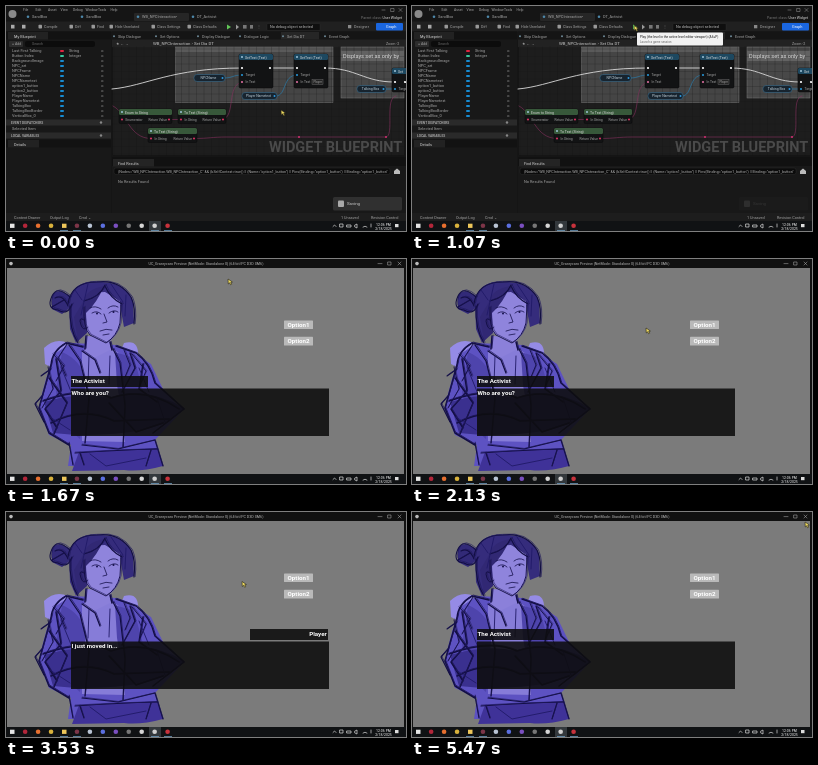
Write an HTML page that moves like this. It is 400 px wide and 225 px high and loops after 5.54 s.

```html
<!DOCTYPE html>
<html lang="en">
<head>
<meta charset="utf-8">
<title>Dialogue widget preview</title>
<style>
html, body { margin: 0; width: 100%; height: 100%; overflow: hidden; background: #111; }
svg { display: block; width: 100vw; height: 100vh; font-family: Roboto, "Open Sans", sans-serif; }
</style>
</head>
<body>
<svg id="stage" viewBox="0 0 400 225" preserveAspectRatio="none"></svg>
<script>
const LOOP = 5540;
const rect = (x, y, w, h, fill, extra = '') =>
  `<rect x="${x}" y="${y}" width="${w}" height="${h}" fill="${fill}" ${extra}/>`;
const dot = (x, y, r, fill) => `<circle cx="${x}" cy="${y}" r="${r}" fill="${fill}"/>`;
const label = (x, y, text, size = 3.9, fill = '#a6a6a6', extra = '') =>
  `<text x="${x}" y="${y}" font-size="${size}" fill="${fill}" ${extra}>${text}</text>`;
const shape = (d, fill) => `<path d="${d}" fill="${fill}"/>`;
const line = (d, color, width = 0.6) =>
  `<path d="${d}" fill="none" stroke="${color}" stroke-width="${width}" stroke-linecap="round" stroke-linejoin="round"/>`;
const group = (id, body) => `<g id="${id}">${body}</g>`;
const BOLD = 'font-weight="700"';
const END = 'text-anchor="end"';
const MIDDLE = 'text-anchor="middle"';

function node(x, y, w, h, title, header, rows, firstRow) {
  return rect(x, y, w, h, '#121314', 'rx="1.5" stroke="#08090a" stroke-width=".5"') +
    rect(x, y, w, 6, header, 'rx="1.5"') +
    label(x + 6, y + 4.5, title, 3.5, '#dcdcdc') + dot(x + 3, y + 3, 1, '#9ec3d8') +
    rows.map(([left, right, color], i) => {
      const cy = y + firstRow + i * 7;
      return dot(x + 3, cy, 1.1, color) + label(x + 6.5, cy + 1.2, left, 3.3) +
        (right ? label(x + w - 5, cy + 1.2, right, 3.3, '#a6a6a6', END) : '') +
        (right || !left ? dot(x + w - 3, cy, 1.1, color) : '');
    }).join('');
}
const setText = x => node(x, 48, 34, 34, 'SetText (Text)', '#1d4860',
  [['', '', '#fff'], ['Target', '', '#2794d2'], ['In Text', '', '#db6e9e']], 14);
const convert = (x, y, w, title, input) => node(x, y, w, 14.5, title, '#37583a', [[input, 'Return Value', '#d0305f']], 10.5);

const pill = (x, y, w, text) =>
  rect(x, y, w, 7, '#17242f', 'rx="3" stroke="#3b6c8c" stroke-width=".6"') +
  label(x + w / 2 - 1, y + 4.8, text, 3.4, '#c5d3dc', MIDDLE) + dot(x + w - 2.5, y + 3.5, 1, '#2d9ae0');

function editorChrome() {
  const tabs = [[26, 'SandBox'], [80, 'SandBox'], [136, 'WB_NPCInteraction•'], [191, 'DT_Activist']];
  const tools = [[38, 'Compile'], [69, 'Diff'], [91, 'Find'], [109, 'Hide Unrelated'], [151, 'Class Settings'], [187, 'Class Defaults']];
  return rect(0, 0, 400, 225, '#151515') +
    dot(6.5, 8, 4, '#8a8a8a') +
    ['File', 'Edit', 'Asset', 'View', 'Debug', 'Window', 'Tools', 'Help'].map((s, i) => label(17 + i * 12.5, 5, s, 3.4)).join('') +
    rect(128, 7, 55, 8, '#262626', 'rx="1"') +
    tabs.map(([x, s]) => dot(x - 4, 10.8, 1.3, '#4d87aa') + label(x, 12.3, s, 3.9)).join('') +
    label(396, 12.5, 'Parent class: <tspan fill="#dedede">User Widget</tspan>', 3.6, '#777', END) +
    line('M376 4h3M385 2.5h3v3h-3zM393 2.5l3 3M396 2.5l-3 3', '#999', 0.5) +
    rect(0, 15.5, 400, 10, '#202020') +
    tools.map(([x, s]) => rect(x - 5.5, 18.8, 3.5, 3.7, '#999', 'rx=".7"') + label(x, 22, s, 3.7)).join('') +
    rect(5, 18.8, 3.5, 3.7, '#aaa') + rect(16, 18.8, 3.5, 3.7, '#aaa') +
    shape('M221 18.5v5l4-2.5z', '#61c857') + shape('M230 18.5v5l3-2.5z', '#999') +
    rect(237, 19, 3.6, 3.6, '#777') + rect(244, 19, 3, 3.6, '#777') + label(251, 22.3, '⋮', 4) +
    rect(261, 17.5, 53, 7, '#0f0f0f', 'rx="1" stroke="#3a3a3a" stroke-width=".3"') +
    label(264, 22.2, 'No debug object selected', 3.8, '#c0c0c0') +
    rect(342, 19, 3.3, 3.3, '#888') + label(348, 22.2, 'Designer', 3.8) +
    rect(370, 17, 27, 7.5, '#1a66df', 'rx="1"') + label(380, 22.3, 'Graph', 3.9, '#fff');
}

function sidePanel() {
  const names = ['Last First Talking', 'Button Index', 'BackgroundImage', 'NPC_art', 'NPCFrame', 'NPCName', 'NPCNametext',
    'option1_button', 'option2_button', 'PlayerName', 'PlayerNametext', 'TalkingBox', 'TalkingBoxBorder', 'VerticalBox_0'];
  const section = (y, text) => rect(0, y, 105, 6, '#2a2a2a') + label(5, y + 4.3, text, 3.3, '#a6a6a6', BOLD) + dot(95, y + 3, 1.2, '#888');
  return rect(0, 25.5, 105, 181.5, '#181818') + rect(0, 25.5, 105, 8, '#121212') + rect(2, 26, 40, 7.5, '#222') +
    label(8, 31.8, 'My Blueprint', 3.9, '#d5d5d5') +
    rect(3, 35, 14, 6, '#2c2c2c', 'rx="1"') + label(6, 39.4, '+ Add', 3.6) +
    rect(19, 35, 70, 6, '#0c0c0c', 'rx="2"') + label(26, 39.4, 'Search', 3.6, '#686868') +
    names.map((s, i) => {
      const y = 46.2 + i * 5;
      const kind = ['String', 'Integer'][i];
      const color = ['#e0243f', '#39c9a0'][i] || '#178bd2';
      return label(6, y, s, 3.9) + rect(54, y - 2.3, 4, 2, color, 'rx="1"') +
        (kind ? label(63, y, kind, 3.9) : '') + rect(95, y - 1.8, 2.5, 1, '#777', 'rx=".5"');
    }).join('') +
    section(113.5, 'EVENT DISPATCHERS') + label(6, 124.3, 'Selected Item') + section(126.5, 'LOCAL VARIABLES') +
    rect(0, 133.5, 105, 8, '#121212') + rect(2, 134, 31, 7.5, '#222') + label(8, 139.5, 'Details', 3.9, '#d5d5d5');
}

function graph() {
  const tabs = [[112, 'Skip Dialogue'], [154, 'Set Options'], [196, 'Display Dialogue'], [238, 'Dialogue Logic'], [281, 'Set Dia DT'], [323, 'Event Graph']];
  let grid = '';
  for (let x = 108; x < 398; x += 7.5) grid += `M${x} 41V149`;
  for (let y = 43; y < 149; y += 7.5) grid += `M107 ${y}H398`;
  return rect(106, 25.5, 294, 124.5, '#151515') + rect(275, 26, 38, 7.5, '#262626') +
    tabs.map(([x, s]) => dot(x - 4, 30.3, 1, '#6d8796') + label(x, 31.8, s, 3.8)).join('') +
    rect(106, 33.5, 294, 7.5, '#222') + label(110, 39, '★  ←  →', 3.8) +
    label(147, 39.4, 'WB_NPCInteraction  ›  Set Dia DT', 4.3, '#c8c8c8') + label(380, 39.2, 'Zoom -2', 3.6) +
    rect(107, 41, 291, 108, '#1d1d1d') +
    rect(169.5, 41, 157.5, 55.5, '#454545', 'stroke="#777" stroke-width=".5"') + rect(170, 41, 157, 5, '#5a5a5a') +
    rect(335, 41, 63, 51, '#484848', 'stroke="#777" stroke-width=".5"') + rect(335, 45, 63, 10, '#626262') +
    `<g opacity=".6">${line(grid, '#161616', 0.35)}</g>` +
    label(337, 52.3, 'Displays set as only by', 5.6, '#d9d9d9') +
    line('M106 83C140 80 165 62 236 62M264 62H291M319 62C350 62 358 76 388 76', '#d8d8d8', 0.9) +
    line('M219 72C226 72 227 69 236 69M270 90C281 90 276 69 291 69M380 83H388', '#2685bd') +
    line('M163 113.5H175M107 100C121 107 123 132.5 145 132.5M188 132.5C203 132.5 206 131 220 131H380M217 113.5C230 110 220 79 236 76M380 131C389 131 378 91 390 90', '#87305f', 0.6) +
    dot(293, 131, 1, '#d0306f') + dot(380, 131, 1, '#d0306f') +
    setText(233) + setText(288) +
    rect(306, 73.5, 11, 5, '#242424', 'stroke="#777" stroke-width=".4"') + label(307.5, 77.2, 'Player', 3) +
    pill(188, 68.5, 31, 'NPCName') + pill(236, 86.5, 35, 'Player Nametext') + pill(351, 79.5, 29, 'Talking Box') +
    node(386, 62, 16, 24, 'Set', '#1d4860', [['', '', '#fff'], ['Target', '', '#2794d2']], 14) +
    convert(113, 103, 53, 'Enum to String', 'Enumerator') +
    convert(172, 103, 48, 'To Text (String)', 'In String') + convert(142, 122, 49, 'To Text (String)', 'In String') +
    label(263, 146, 'WIDGET BLUEPRINT', 14.5, '#4a4a4a', BOLD);
}

function lowerPanels() {
  const query = '(Nodes="WB_NPCInteraction.WB_NPCInteraction_C" &amp;&amp; (bSelfContext=true)) || (Name="option1_button") || Pins(Binding="option1_button") || Binding="option1_button"';
  return rect(106, 151, 294, 56, '#181818') + rect(106, 151, 294, 9, '#111') + rect(107, 153, 41, 7.5, '#242424') +
    label(112, 158.8, 'Find Results', 3.8, '#d4d4d4') + rect(108, 162, 276, 6.5, '#0b0b0b', 'rx="2" stroke="#333" stroke-width=".4"') +
    label(112, 166.6, query, 3.7, '#b4b4b4') + shape('M388 165l3-2.5 3 2.5v3h-6z', '#bbb') +
    label(112, 177, 'No Results Found', 3.9) +
    rect(0, 207, 400, 8, '#1d1d1d') +
    label(8, 213, 'Content Drawer', 3.8) + label(44, 213, 'Output Log', 3.8) + label(73, 213, 'Cmd ⌄', 3.8) +
    label(335, 213, '1 Unsaved', 3.8) + label(365, 213, 'Revision Control', 3.8);
}

const toast = rect(327, 191, 69, 13.5, '#303030', 'rx="1.5"') + rect(332, 194.5, 6, 6.5, '#aaa', 'rx="1"') + label(341, 198.5, 'Saving', 4.4, '#ccc');
const tooltip = rect(225, 26.5, 86, 13, '#f2f2f2', 'rx="1"') +
  label(228, 31.8, 'Play (the level in the active level editor viewport) (Alt+P)', 3.2, '#111') +
  label(228, 37, 'Launch a game session', 3, '#666');

// Two slightly displaced passes give the hand-drawn line.
const sketch = (d, width = 1) => line(d, '#120e42', width * 1.15) +
  `<g transform="translate(.8 -.7) rotate(.4 95 120)">${line(d, '#1d1658', width * 0.65)}</g>`;

function character() {
  return shape('M38 89Q49 78 62 84L54 113L39 105ZM118 84Q133 80 132 97L125 111L112 99Z', '#958be6') +
    shape('M65 84L50 94Q39 116 33 150L43 176L65 186L62 207H157L149 181L177 151L158 132L145 105L128 94L111 86Z', '#5d52c2') +
    shape('M79 77Q82 88 76 95L82 117L111 121L117 97L104 88V78Z', '#8b80da') +
    shape('M76 92L88 99L104 91L113 99L119 183L76 182Z', '#867cd8') +
    shape('M56 93Q75 101 80 121L74 180L57 165L50 133ZM109 93L128 99L139 139L119 172L111 126Z', '#4e44ac') +
    shape('M38 143Q75 132 105 139Q142 127 178 149L163 163L138 171Q91 179 47 174Z', '#3a308f') +
    shape('M73 193L152 189L157 207Q135 213 118 211L66 212Z', '#3f3298') +
    shape('M63 40Q69 20 96 23Q120 24 127 42L128 64L118 68L113 41L78 39L81 72L70 84L64 70Z', '#352c7c') +
    shape('M46 42Q44 33 54 32L65 37L65 48L56 55L46 50Z', '#322a78') +
    shape('M77 45Q82 33 99 33L114 42L115 64Q111 78 101 84Q89 81 81 73Z', '#8f84dc') +
    shape('M77 43Q80 30 98 27Q91 44 80 54L81 74L72 82L68 58Z', '#312874') +
    sketch('M62 45Q65 23 91 23Q113 20 125 38Q130 49 128 65M64 47Q63 70 72 84M78 42Q94 38 99 26M99 27Q104 39 116 45') +
    sketch('M64 38Q51 26 46 37Q40 50 52 51Q62 57 66 45M49 39Q57 35 62 47M46 48L58 41', 0.9) +
    sketch('M78 48Q77 69 84 76L100 84Q111 77 114 64L115 46M78 61Q72 57 75 66Q77 72 81 69', 0.8) +
    line('M84 49Q89 46 95 50M102 49Q107 45 112 48M86 54Q91 51 95 55M103 54Q108 50 112 53M98 55L101 63L97 64M94 72Q100 69 106 71M97 76L103 75', '#17124d', 0.8) +
    dot(91, 54.5, 1, '#17124d') + dot(107.5, 53, 1, '#17124d') +
    sketch('M80 77L79 90M104 83L106 91M77 88L60 84Q46 92 45 106L33 149L43 174L63 186M110 87L130 94Q144 104 149 124L178 150L147 174', 1.3) +
    sketch('M63 86L74 102L83 138L79 184M76 92L89 101L94 114M107 90L114 104L119 147L117 188M124 94L129 109L116 133', 1.1) +
    sketch('M50 100L55 132L39 150L51 169M43 119L61 144L48 175M137 105L133 130L151 143M37 142Q78 127 105 139Q140 127 173 150M45 164Q77 147 108 162L163 160M103 144L130 173L157 164', 1.3) +
    sketch('M63 184L67 206M76 186L112 190L149 181L157 207M69 194Q112 191 151 190M74 194L78 206M145 191L140 207M36 137L29 145L38 163M45 110L35 117', 1) +
    sketch('M47 95L58 107L50 122M61 85L52 99L60 117M126 95L140 112L134 126M42 108L47 130L36 149M118 91L124 106L119 118', 0.8) +
    line('M69 31L76 41M82 25L75 56M105 25L117 43M120 36L119 57M83 97L82 126M104 97L103 125M55 108L66 135M133 109L143 133M44 158L64 171M151 139L159 163M84 195L100 207L140 199', '#211a68', 0.9);
}

function previewFrame() {
  return rect(0, 0, 400, 215, '#111') + rect(1, 9, 397, 206, '#7b7b7b') + dot(5, 4.6, 1.8, '#bbb') +
    label(200, 6, 'UC_Granrycaro Preview [NetMode: Standalone 0]  (64-bit/PC D3D SM6)', 3.7, '#b5b5b5', MIDDLE) +
    line('M372 4.6h4M382 3h3v3h-3zM392 3l3 3M395 3l-3 3', '#b5b5b5', 0.5);
}

const option = (y, text) => rect(278, y, 29, 8.7, '#b9b9b9', 'rx=".6"') +
  label(292.6, y + 6.5, text, 6.2, '#fff', `${BOLD} ${MIDDLE}`);

function dialogue() {
  const box = 'rgba(13,13,13,.88)';
  return option(61.4, 'Option1') + option(77.8, 'Option2') + rect(65, 129.5, 258, 47.5, box) +
    group('activist', rect(65, 117, 77, 11, box) + label(65.5, 123.8, 'The Activist', 6.2, '#fff', BOLD)) +
    group('player', rect(244, 117, 78, 11, box) + label(320.8, 124.2, 'Player', 6.2, '#fff', `${BOLD} ${END}`)) +
    label(65.5, 136, '', 6.2, '#fff', BOLD + ' id="speech"');
}

function taskbar() {
  const colors = ['#e6e6e6', '#b3263a', '#e8702f', '#d9b23c', '#edc65a', '#7c3548', '#b9c4d4', '#5b6fe0', '#7a4fc0', '#777', '#d5d5d5', '#d0d0d0', '#c8323c'];
  return rect(0, 215, 400, 10, '#101214') + rect(143, 215, 12, 10, '#33383c') +
    colors.map((c, i) => i === 0 || i === 4 ? rect(4 + i * 13, 217.7, 4.5, 4.2, c) : dot(6.2 + i * 12.95, 219.8, 2.3, c)).join('') +
    [58, 71, 149, 162].map(x => rect(x - 4, 224.3, 8, 0.7, '#75a8d0')).join('') +
    line('M327 220.5l1.5-1.5 1.5 1.5M334 218h3v3h-3zM341 219h4v2h-4zM349 219l2-1v4l-2-1zM357 221a3 3 0 0 1 4 0M365 218v3', '#ddd', 0.7) +
    label(377.5, 219.6, '12:06 PM', 3.5, '#eee', MIDDLE) + label(377.5, 224.1, '2/18/2025', 3.5, '#eee', MIDDLE) +
    rect(389, 218, 3.5, 3.2, '#ddd');
}

document.getElementById('stage').innerHTML =
  group('editor', editorChrome() + sidePanel() + graph() + lowerPanels() + group('toast', toast) + group('tooltip', tooltip) +
    group('playing', rect(107.5, 39, 290, 110.5, 'none', 'stroke="#ffad27" stroke-width="1.2"'))) +
  group('preview', previewFrame()) + group('scene', character() + dialogue()) + taskbar() +
  group('cursor', '<path d="M0 0L.3 5L1.6 3.8L2.7 5.8L3.7 5.2L2.7 3.3L4.4 3Z" fill="#f1dc62" stroke="#242315" stroke-width=".6"/>');

const parts = Object.fromEntries([...document.querySelectorAll('[id]')].map(el => [el.id, el]));
const cursorPath = [[0, 275, 104], [90, 275, 104], [650, 222, 19], [1470, 222, 20], [1780, 222, 20], [2080, 234, 69],
  [3070, 234, 69], [3400, 236, 69.5], [4230, 236, 69.5], [4500, 275.5, 53], [4560, 276, 53], [4800, 358, 24], [5100, 393, 10], [LOOP, 393, 10]];
const clamp = v => Math.max(0, Math.min(1, v));
const ease = v => v * v * (3 - 2 * v);
const fade = (t, from, to) => ease(clamp((t - from) / (to - from)));

function position(t) {
  const next = cursorPath.findIndex(p => p[0] > t);
  const a = cursorPath[next - 1], b = cursorPath[next];
  const k = fade(t, a[0], b[0]);
  return [a[1] + (b[1] - a[1]) * k, a[2] + (b[2] - a[2]) * k];
}

function speechAt(t) {
  const typed = (text, start, pace) => text.slice(0, Math.max(0, Math.floor((t - start) / pace)));
  if (t < 2700) return typed('Who are you?', 1260, 30);
  if (t < 3970) return typed('I just moved in...', 2800, 28);
  return '';
}

function render(now) {
  const t = now % LOOP;
  const playerTurn = t >= 2700 && t < 3970;
  parts.toast.style.opacity = 1 - 0.85 * fade(t, 500, 1000);
  parts.tooltip.style.opacity = fade(t, 820, 940) * (1 - fade(t, 1250, 1330));
  parts.playing.style.opacity = t >= 1330 ? 1 : 0;
  parts.preview.style.opacity = fade(t, 1330, 1560);
  parts.scene.style.opacity = fade(t, 1360, 1470);
  parts.activist.style.opacity = playerTurn ? 0 : 1;
  parts.player.style.opacity = playerTurn ? 1 : 0;
  parts.speech.textContent = speechAt(t);
  parts.cursor.setAttribute('transform', `translate(${position(t)})`);
  requestAnimationFrame(() => render(performance.now()));
}
render(performance.now());
</script>
</body>
</html>
```
